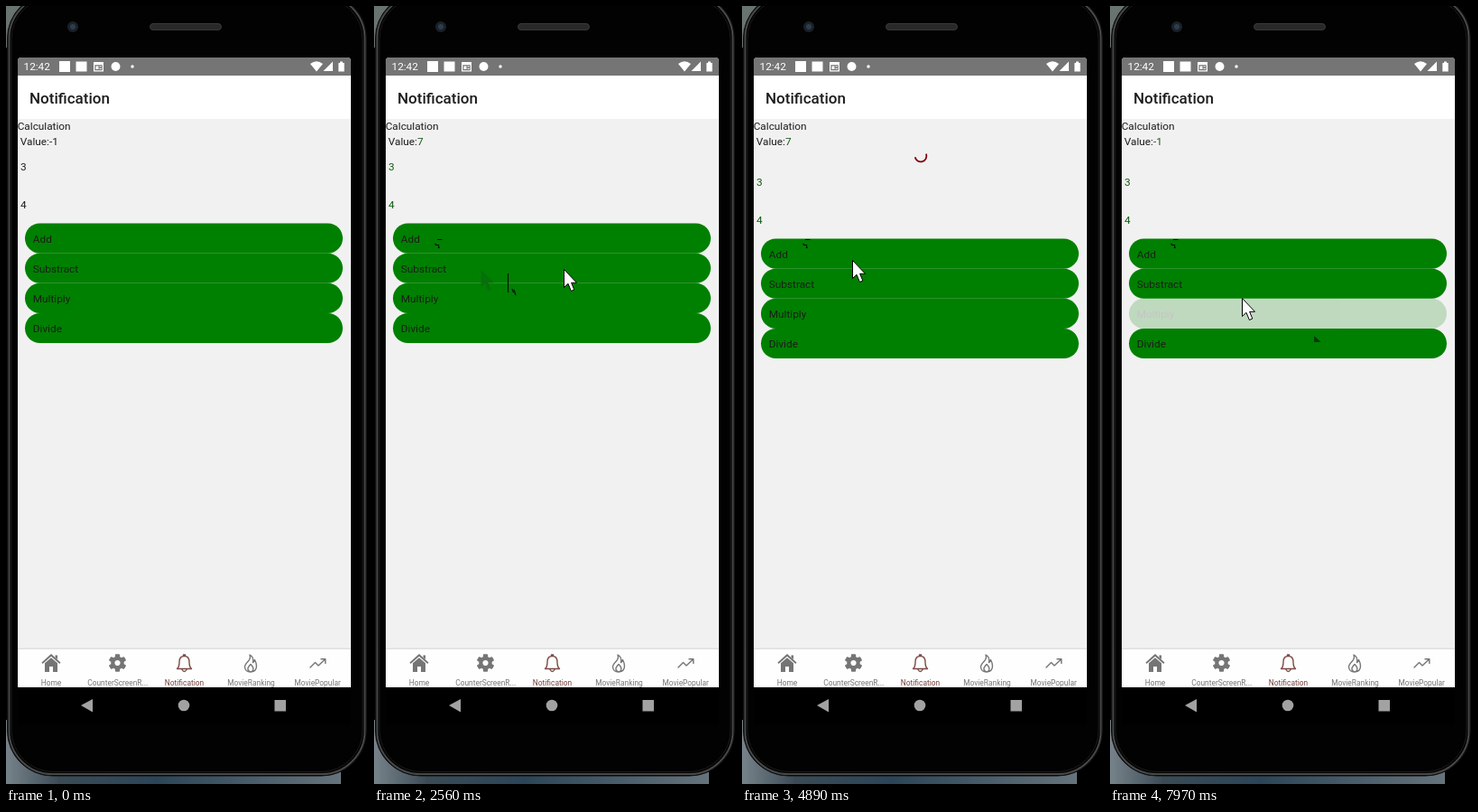
An HTML page for the animation above (8000 ms loop, 401x861 px).

```html
<!DOCTYPE html>
<html lang="en">
<head>
<meta charset="utf-8">
<title>Calculator demo</title>
<style>
  html, body { margin: 0; width: 100%; height: 100%; overflow: hidden; background: #000; }
  svg { display: block; width: 401px; height: 861px; }
  text { font: 11.8px Roboto, sans-serif; fill: #1c1c1c; }
  .title { font-size: 17px; font-weight: 500; }
  .clock { fill: #fff; }
  .tab text { font-size: 8.4px; text-anchor: middle; fill: #757575; }
  .tab .active { fill: #76433c; }
  .line { fill: none; stroke-width: 1.4; stroke-linecap: round; stroke-linejoin: round; }
  .mark { fill: none; stroke: #001000; stroke-width: 1.2; }
</style>
</head>
<body>
<svg viewBox="0 0 401 861">
  <defs>
    <linearGradient id="wall" x1="0" x2="1">
      <stop offset="0" stop-color="#77838a"/>
      <stop offset=".16" stop-color="#3b4b56"/>
      <stop offset=".45" stop-color="#2b4558"/>
      <stop offset="1" stop-color="#66737b"/>
    </linearGradient>
    <path id="arrow" d="M.5 .5V20.5L5 16.3L8.4 24.5L11.8 23L8.6 15.3H14.5Z"/>
  </defs>

  <!-- desktop and phone body -->
  <rect width="401" height="861"/>
  <rect width="24" height="46" fill="#69736f"/>
  <rect y="790" width="371" height="71" fill="url(#wall)"/>
  <rect x="1.5" y="-14" width="398" height="866" rx="50" fill="#000" stroke="#111"/>
  <rect x="3.5" y="-12" width="394" height="862" rx="48" fill="#000" stroke="#484848" stroke-width="2"/>
  <rect x="6" y="-9.500" width="389" height="857" rx="46" fill="#020202" stroke="#1c1c1c"/>
  <circle cx="74" cy="23" r="6" fill="#1c2126"/>
  <circle cx="74" cy="23" r="3" fill="#2b3d50"/>
  <rect x="159.500" y="19.500" width="79" height="7" rx="3.500" fill="#292929" stroke="#383838"/>

  <!-- screen -->
  <path d="M13 125V61Q13 57 17 57H378Q382 57 382 61V754H13Z" fill="#f1f1f1"/>
  <path d="M13 77V61Q13 57 17 57H378Q382 57 382 61V77Z" fill="#757575"/>
  <rect x="13" y="77" width="369" height="48" fill="#fff"/>
  <rect x="13" y="754" width="369" height="41" rx="3" fill="#000"/>
  <text class="clock" x="19.500" y="71.300">12:42</text>
  <g fill="#fff">
    <rect x="59" y="61" width="12" height="12"/>
    <rect x="77.500" y="61.500" width="12" height="11"/>
    <path fill-rule="evenodd" d="M97 62H108V72.500H97ZM98.300 65.300V71.200H106.700V65.300ZM99.500 66.500H102.500V70H99.500ZM103.500 66.500H105.800V67.500H103.500ZM103.500 69H105.800V70H103.500Z"/>
    <circle cx="121.500" cy="67" r="5"/>
    <circle cx="140" cy="67" r="1.700"/>
    <path d="M344 72.500L337 64Q344 58.500 351 64Z"/>
    <path d="M362 61.500V72H351.500Z"/>
    <path d="M368.300 63H370V61.500H373V63H374.700V72.500H368.300Z"/>
  </g>
  <text class="title" x="26" y="107.800">Notification</text>
  <text x="12.700" y="137.400">Calculation</text>
  <text x="15.800" y="153.500">Value:<tspan id="value">-1</tspan></text>
  <path id="spinner" fill="none" stroke="#800010" stroke-width="1.800"/>
  <g id="form">
    <g id="inputs"><text x="16" y="182">3</text><text x="16" y="223.700">4</text></g>
    <g id="buttons"></g>
  </g>

  <!-- tab bar -->
  <rect x="13" y="710.500" width="369" height="1.500" fill="#dfdfdf"/>
  <rect x="13" y="712" width="369" height="42" fill="#fefefe"/>
  <g fill="#757575">
    <path d="M50 717L60.500 726.500L59.300 728L50 719.800L40.700 728L39.500 726.500ZM54.500 718.500H57V723L54.500 720.800ZM50 721.300L57 727.300V737H52V731H48V737H43V727.300Z"/>
    <g id="gear" transform="translate(123.500 727)"></g>
  </g>
  <g class="line" stroke="#7d4a43">
    <path d="M189.500 733.500Q192 731.500 192 726Q192 719.500 197.500 719.500Q203 719.500 203 726Q203 731.500 205.500 733.500ZM196.500 719V718H198.500V719M195 734.500Q197.500 738.500 200 734.500"/>
  </g>
  <g class="line" stroke="#757575">
    <path d="M270 718Q271.500 722 268 725.500Q264.500 729 264.500 731.500Q265 737 271 737Q277.500 736.500 277.500 730.500Q277.500 727 275.500 723.500Q275 726 273.500 726.500Q275 721 270 718ZM271 737Q267.500 736 268 732.500Q269 730.500 271 728.500Q274.500 732 273.800 734.500Q273 737 271 737"/>
    <path d="M337 732L342.500 726.500L346 730L353 723.500M349 722.800H353.800V727.500"/>
  </g>
  <g class="tab">
    <text x="50" y="751.500">Home</text>
    <text x="123.700" y="751.500">CounterScreenR...</text>
    <text class="active" x="197.500" y="751.500">Notification</text>
    <text x="271.500" y="751.500">MovieRanking</text>
    <text x="345.200" y="751.500">MoviePopular</text>
  </g>
  <g fill="#a2a2a2">
    <path d="M83 774L96 767V781.500Z"/>
    <circle cx="197" cy="774" r="6.300"/>
    <rect x="297.500" y="768" width="12.500" height="12.500"/>
  </g>

  <!-- stale pointer marks -->
  <use id="shade" href="#arrow" x="118" y="291" fill="#06700a"/>
  <path id="markA" class="mark" d="M70 258.500H75.500M67.500 263L69.500 265M69 264.500H71.500V267.500H73"/>
  <path id="markB" class="mark" d="M148.500 296V317M153 313L154.500 317M155 314L157 320"/>
  <path id="markC" class="mark" d="M210 312L214.500 307.500L217 310M220 310H225M217 315H223"/>
  <path id="markD" d="M226 365L234 372H226Z" fill="#053d05"/>

  <use id="pointer" href="#arrow" fill="#fff" stroke="#000"/>
</svg>
<script>
const LOOP = 8000;
const $ = id => document.getElementById(id);
const SVG = "http://www.w3.org/2000/svg";

function add(parent, tag, attrs, text = "") {
  const el = document.createElementNS(SVG, tag);
  for (const k in attrs) el.setAttribute(k, attrs[k]);
  el.textContent = text;
  return parent.appendChild(el);
}

const buttons = ["Add", "Substract", "Multiply", "Divide"].map((name, i) => {
  const y = 240.5 + i * 33.15;
  const g = add($("buttons"), "g", {});
  add(g, "rect", { x: 21, y, width: 352, height: 33.15, rx: 16.5, fill: "#008000" });
  add(g, "text", { x: 29.8, y: y + 21.2 }, name);
  return g;
});

for (let a = 0; a < 360; a += 60)
  add($("gear"), "rect", { x: -2.6, y: -9.8, width: 5.2, height: 5, rx: 1, transform: `rotate(${a})` });
add($("gear"), "circle", { r: 5.2, fill: "none", stroke: "#757575", "stroke-width": 4.2 });

// The picture only advances at these moments: [first, last, count]
const ticks = [0];
for (const [a, b, n] of [
  [120, 890, 12], [960, 1730, 12], [1800, 2560, 11], [2630, 2630, 1], [3030, 3030, 1],
  [3360, 3710, 6], [3910, 3980, 2], [4260, 5030, 12], [5100, 5860, 11],
  [6470, 6470, 1], [6800, 7420, 10], [7680, 7970, 5]
]) for (let i = 0; i < n; i++) ticks.push(n > 1 ? Math.round(a + (b - a) * i / (n - 1)) : a);

// Pointer tip: time, x, y
const path = [
  [120, 309, 846], [400, 250, 640], [680, 160, 400], [890, 114, 316], [1030, 118, 291],
  [1310, 62, 245], [1800, 62, 245], [2300, 148, 295], [2560, 210, 291], [2630, 210, 290],
  [3030, 210, 289], [3360, 200, 280], [3500, 150, 247], [3710, 121, 273], [3910, 121, 297],
  [3980, 121, 285], [4260, 121, 284], [4540, 122, 281], [5100, 122, 281], [5480, 170, 335],
  [5860, 236, 403], [6400, 236, 403], [6470, 203, 392], [6800, 222, 388], [6940, 236, 372],
  [7080, 226, 357], [7350, 150, 305], [7420, 146, 323]
];
const presses = [[0, 1370, 1546], [1, 4220, 4580], [2, 7640, 7960]];
const loads = [[1570, 2440], [4590, 5420], [7965, LOOP]];

const clamp = x => Math.max(0, Math.min(1, x));
const smooth = x => x < .5 ? 2 * x * x : 1 - 2 * (1 - x) ** 2;

// cubic-bezier(.4, 0, .2, 1)
function fastOutSlowIn(x) {
  let lo = 0, hi = 1, u = .5;
  for (let i = 0; i < 20; i++) {
    u = (lo + hi) / 2;
    const bx = 1.2 * u * (1 - u) ** 2 + .6 * u * u * (1 - u) + u ** 3;
    if (bx < x) lo = u; else hi = u;
  }
  return 3 * u * u * (1 - u) + u ** 3;
}

function pointerAt(t) {
  const i = path.findIndex(p => p[0] > t);
  if (i < 0) return path[path.length - 1].slice(1);
  if (i === 0) return path[0].slice(1);
  const [t0, x0, y0] = path[i - 1], [t1, x1, y1] = path[i];
  const k = (t - t0) / (t1 - t0);
  return [x0 + (x1 - x0) * k, y0 + (y1 - y0) * k].map(Math.round);
}

function arcAt(ms) {
  const u = ms % 1333 / 1333, turn = ms / 4444 * 2 + u * .25;
  const from = turn + .75 * fastOutSlowIn(clamp(u * 2 - 1));
  const to = turn + .75 * fastOutSlowIn(clamp(u * 2));
  if (to - from < .01) return "";
  const at = f => {
    const a = (f - .25) * 2 * Math.PI;
    return `${(198 + 6.4 * Math.cos(a)).toFixed(2)} ${(166 + 6.4 * Math.sin(a)).toFixed(2)}`;
  };
  return `M${at(from)}A6.4 6.4 0 ${to - from > .5 ? 1 : 0} 1 ${at(to)}`;
}

function show(id, on) { $(id).style.display = on ? "" : "none"; }

function draw(t) {
  const load = loads.find(([a, b]) => t >= a && t < b);
  $("form").setAttribute("transform", `translate(0 ${load ? 17 : 0})`);
  $("spinner").setAttribute("d", load ? arcAt(t - load[0]) : "");

  buttons.forEach(b => b.setAttribute("opacity", 1));
  for (const [i, down, up] of presses) {
    if (t < down) continue;
    const o = t < up ? 1 - .8 * smooth(clamp((t - down) / 150))
                     : .2 + .8 * smooth(clamp((t - up) / 250));
    buttons[i].setAttribute("opacity", o);
  }

  $("value").textContent = t >= loads[0][1] && t < loads[1][1] ? "7" : "-1";
  $("value").style.fill = t >= loads[0][1] ? "#1d551d" : "#1c1c1c";
  for (const el of $("inputs").children) el.style.fill = t >= loads[0][0] ? "#0b5c0b" : "#1c1c1c";

  const [x, y] = pointerAt(t);
  $("pointer").setAttribute("transform", `translate(${x} ${y})`);
  show("pointer", t >= 120);
  show("shade", t >= 1100 && t < 4590);
  show("markA", t >= 1950);
  show("markB", t >= 2380 && t < 4590);
  show("markC", t >= 3360 && t < 4590);
  show("markD", t >= 7150);
}

let last = -1;
function tick() {
  const now = performance.now() % LOOP;
  let t = 0;
  for (const s of ticks) if (s <= now) t = s;
  if (t !== last) draw(last = t);
  requestAnimationFrame(tick);
}
tick();
</script>
</body>
</html>
```
